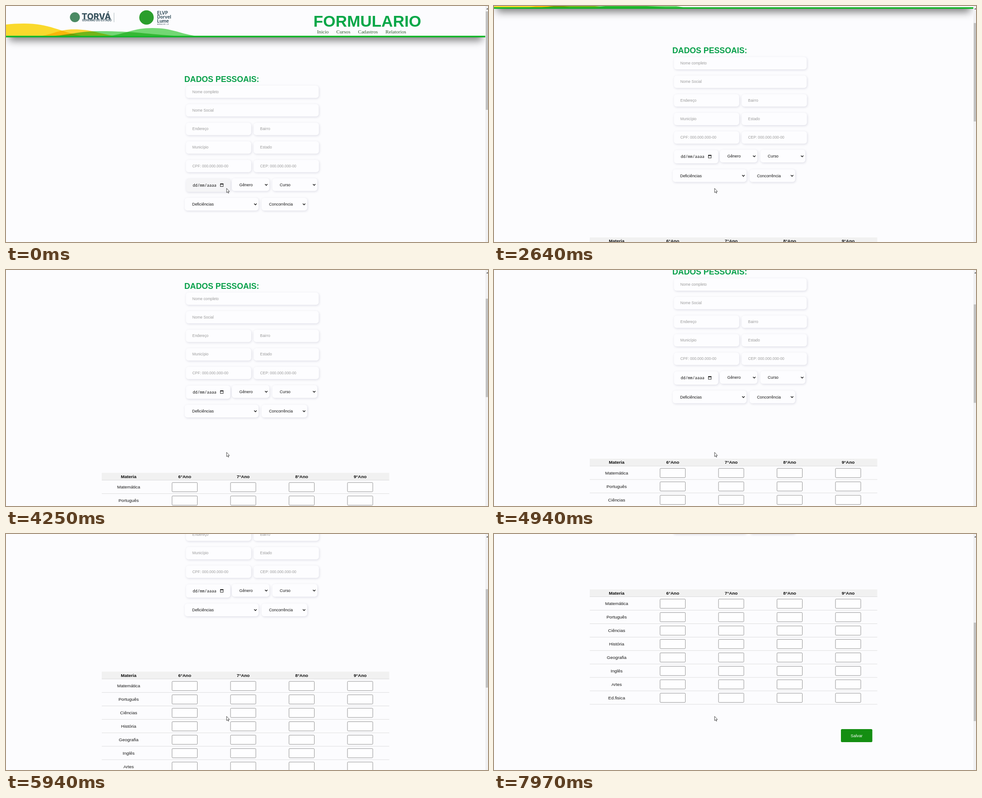
An HTML page with a canvas for the animation above (8 s loop, 1067x525 px).

```html
<!DOCTYPE html>
<html lang="pt-BR">
<head>
<meta charset="utf-8">
<title>Formulario</title>
<style>
  html, body { margin: 0; width: 100%; height: 100%; overflow: hidden; background: #fcfcfe; }
  canvas { display: block; }
</style>
</head>
<body>
<canvas id="stage" width="1067" height="525"></canvas>
<script>
const ctx = document.getElementById('stage').getContext('2d');
const LOOP = 8000, PAGE_W = 1061, PAPER = '#fcfcfe';
const SANS = '"Liberation Sans", Arial, sans-serif';
const SERIF = '"Liberation Serif", "Times New Roman", serif';
const MONO = '"Noto Sans Mono", "DejaVu Sans Mono", monospace';
const INTER = 'Inter, "Open Sans", sans-serif';

// Wheel moves: first step, last step, step count, scroll reached, sharpness
const MOVES = [
  [1820, 2080, 3, 21.2, 5],
  [2250, 2300, 2, 42.3, 1],
  [2600, 2640, 2, 63.5, 1],
  [3120, 3290, 2, 84.7, 1],
  [3640, 3640, 1, 105.8, 1],
  [3860, 4250, 6, 127, 2],
  [4720, 5290, 8, 211, 1],
  [5370, 5500, 3, 230, 1],
  [5940, 5940, 1, 272, 1],
  [6500, 6710, 4, 332.4, 1],
  [7150, 7280, 3, 353.5, 5],
  [7450, 7580, 2, 417, 1],
  [7750, 7970, 5, 455, 1]
];

function scrollAt(t) {
  let y = 0;
  for (const [start, end, steps, goal, sharp] of MOVES) {
    if (t < start) break;
    const gap = steps > 1 ? (end - start) / (steps - 1) : 1;
    const p = Math.min(1, (Math.floor((t - start) / gap + 1e-6) + 1) / steps);
    const a = p ** sharp, b = (1 - p) ** sharp;
    y += (goal - y) * a / (a + b);
  }
  return y;
}

// y is the middle of the capitals
function text(str, x, y, size, color, { font = SANS, weight = 400, align = 'left', spacing = 0 } = {}) {
  ctx.font = `${weight} ${size}px ${font}`;
  ctx.textAlign = align;
  ctx.letterSpacing = spacing + 'px';
  ctx.fillStyle = color;
  ctx.fillText(str, x, y + size * 0.355);
}

function rect(x, y, w, h, color) {
  ctx.fillStyle = color;
  ctx.fillRect(x, y, w, h);
}

function rounded(x, y, w, h, r, color) {
  ctx.beginPath();
  ctx.roundRect(x, y, w, h, r);
  ctx.fillStyle = color;
  ctx.fill();
}

function disc(x, y, r, color) {
  ctx.beginPath();
  ctx.arc(x, y, r, 0, 7);
  ctx.fillStyle = color;
  ctx.fill();
}

function shadow(color, blur, dx, dy, draw) {
  ctx.save();
  ctx.shadowColor = color;
  ctx.shadowBlur = blur;
  ctx.shadowOffsetX = dx;
  ctx.shadowOffsetY = dy;
  draw();
  ctx.restore();
}

function hill(x0, peakX, peakY, x1, color) {
  const base = 66.5, h = base - peakY, a = peakX - x0, b = x1 - peakX;
  ctx.beginPath();
  ctx.moveTo(x0, base);
  ctx.bezierCurveTo(x0 + a * 0.4, base - h * 0.3, peakX - a * 0.45, peakY, peakX, peakY);
  ctx.bezierCurveTo(peakX + b * 0.45, peakY, x1 - b * 0.4, base - h * 0.35, x1, base);
  ctx.fillStyle = color;
  ctx.fill();
}

function header() {
  shadow('rgba(0,0,0,.5)', 17, 0, 9, () => rect(7, 20, PAGE_W - 14, 48, '#888'));
  rect(0, 0, PAGE_W, 67, PAPER);

  ctx.save();
  ctx.globalCompositeOperation = 'multiply';
  hill(-120, 40, 39, 168, '#fddc2c');
  hill(78, 150, 52, 240, '#ffd637');
  hill(105, 208, 56, 380, '#74da74');
  hill(230, 324, 49, 419, '#74da74');
  ctx.restore();
  rect(0, 66.2, PAGE_W, 3.5, '#10b526');

  const slate = '#3b5560';
  disc(152.5, 25, 11, '#4b8a63');
  text('TORVÁ', 167.5, 23.5, 18.5, slate, { font: INTER, weight: 800 });
  text('GOVERNO DO ESTADO', 168.5, 32.2, 5.9, slate, { font: INTER, weight: 700 });
  rect(238.7, 15, 0.8, 21, '#9aa8ad');

  disc(311, 25.5, 16, '#2a9e2c');
  ['ELVP', 'Dorvel', 'Lume'].forEach((s, i) =>
    text(s, 334.5, 15.4 + i * 9, 9.7, slate, { font: INTER, weight: 700 }));
  text('MIRALVE LV', 335, 40.6, 3.2, slate, { font: INTER, weight: 600, spacing: 0.7 });

  text('FORMULARIO', 680.6, 33.8, 35.2, '#08a748', { weight: 700 });
  [['Inicio', 688.4], ['Cursos', 731.3], ['Cadastros', 779.2], ['Relatorios', 840]].forEach(([s, x]) =>
    text(s, x, 56.9, 11.15, '#2b5b2a', { font: SERIF }));
}

function box(x, y, w, h, color = '#fdfdff') {
  shadow('rgba(95,95,130,.2)', 5, 1, 1.5, () => rounded(x, y, w, h, 6, color));
}

function field(label, x, y, w) {
  box(x, y - 13.5, w, 27.5);
  text(label, x + 14.3, y, 8.34, '#9b9b9b');
}

function select(label, x, y, w) {
  box(x, y - 14.3, w, 28.3);
  text(label, x + 16.4, y, 8.9, '#161616');
  const cx = x + w - 7;
  ctx.beginPath();
  ctx.moveTo(cx - 2.7, y - 1.4);
  ctx.lineTo(cx, y + 1.4);
  ctx.lineTo(cx + 2.7, y - 1.4);
  ctx.strokeStyle = '#111';
  ctx.lineWidth = 1.4;
  ctx.stroke();
}

function dateField(hovered) {
  box(398.5, 384, 98, 29.5, hovered ? '#f5f5f7' : '#fdfdff');
  text('dd/mm/aaaa', 413.2, 398.4, 8.75, '#161616', { font: MONO });
  ctx.strokeStyle = '#111';
  ctx.lineWidth = 0.9;
  ctx.strokeRect(474.6, 395.6, 6.2, 6);
  rect(474.2, 394.9, 7, 2, '#111');
}

function form(hovered) {
  text('DADOS PESSOAIS:', 394.8, 162.3, 17.75, '#08a04a', { weight: 700 });
  const row = i => 190.6 + i * 41.27;
  field('Nome completo', 398.3, row(0), 294);
  field('Nome Social', 398.3, row(1), 294);
  [['Endereço', 'Bairro'], ['Município', 'Estado'], ['CPF: 000.000.000-00', 'CEP: 000.000.000-00']]
    .forEach(([left, right], i) => {
      field(left, 398.3, row(i + 2), 144.5);
      field(right, 548.3, row(i + 2), 144.5);
    });
  dateField(hovered);
  select('Gênero', 500.1, 397.6, 83);
  select('Curso', 589.7, 397.6, 99.5);
  select('Deficiências', 395.6, 441, 163.5);
  select('Concorrência', 565.8, 441, 101);
}

const SUBJECTS = ['Matemática', 'Português', 'Ciências', 'História', 'Geografia', 'Inglês', 'Artes', 'Ed.fisica'];
const LEFT = 212, WIDTH = 636.5, TOP = 594.6, PITCH = 29.91;
const yearX = i => 395.6 + i * 129.45;

function table(t) {
  const center = { align: 'center' }, bold = { align: 'center', weight: 700 };
  rect(LEFT, 578.3, WIDTH, 16.2, '#f1f1f1');
  text('Materia', 271.5, 586.2, 9.9, '#0c0c0c', bold);
  for (let i = 0; i < 4; i++) text(`${i + 6}°Ano`, yearX(i), 586.2, 9.9, '#0c0c0c', bold);

  const glow = [0, Math.min(1, (t - 5585) / 135), 0, 0, 1];
  const lit = t >= 5630 && t < 5940 ? 1 : t >= 6710 && t < 7200 ? 4 : -1;
  if (lit >= 0) rect(LEFT, TOP + lit * PITCH, WIDTH, PITCH, `rgba(243,243,244,${glow[lit]})`);

  for (let i = 0; i <= SUBJECTS.length; i++) rect(LEFT, TOP - 0.4 + i * PITCH, WIDTH, 0.8, '#d6d6d6');
  SUBJECTS.forEach((name, i) => {
    const y = TOP + i * PITCH;
    text(name, 271.5, y + 15.1, 9.9, '#191919', center);
    for (let c = 0; c < 4; c++) {
      ctx.beginPath();
      ctx.roundRect(yearX(c) - 28, y + 5.2, 56, 20.5, 1.6);
      ctx.fillStyle = '#fefeff';
      ctx.fill();
      ctx.strokeStyle = '#777';
      ctx.lineWidth = 0.8;
      ctx.stroke();
    }
  });
  rounded(768, 889, 69.5, 29, 2.5, '#148e12');
  text('Salvar', 802.7, 903.2, 9.4, '#fff', center);
}

function scrollbar(y) {
  rect(PAGE_W, 0, 6, 525, '#f1f1f3');
  rect(1062, 12 + y * 0.407, 5, 219, '#c1c1c1');
  ctx.beginPath();
  ctx.moveTo(1063.2, 7.5);
  ctx.lineTo(1065.6, 4.8);
  ctx.lineTo(1068, 7.5);
  ctx.fillStyle = '#505050';
  ctx.fill();
}

const ARROW = new Path2D('M0 0V9.6L2.2 7.6L3.6 10.8L5 10.2L3.6 7.1H6.4Z');

function pointer() {
  ctx.save();
  ctx.translate(488.3, 405.6);
  ctx.fillStyle = '#fff';
  ctx.fill(ARROW);
  ctx.strokeStyle = '#222';
  ctx.lineWidth = 0.8;
  ctx.stroke(ARROW);
  ctx.restore();
}

function draw(now) {
  const t = now % LOOP, y = scrollAt(t);
  rect(0, 0, 1067, 525, PAPER);
  ctx.save();
  ctx.translate(0, -y);
  header();
  form(y < 8);
  table(t);
  ctx.restore();
  scrollbar(y);
  pointer();
  requestAnimationFrame(draw);
}
requestAnimationFrame(draw);
</script>
</body>
</html>
```
